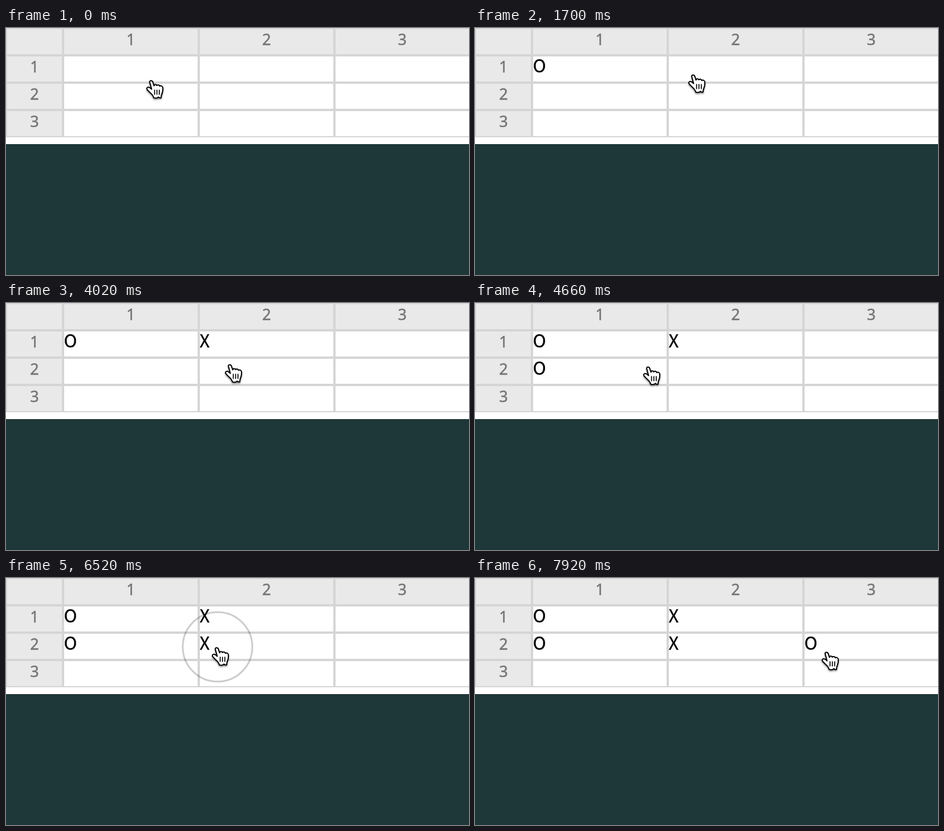
These frames come from a looping animation (812x434 px, 8 s). An HTML page:

```html
<!DOCTYPE html>
<html>
<head>
<meta charset="utf-8">
<style>
  html, body { margin: 0; width: 100%; height: 100%; overflow: hidden; background: #1e3738; }
  svg { display: block; }
  .label { font: 27px "Noto Sans", sans-serif; fill: #757575; stroke: #757575; stroke-width: .5; text-anchor: middle; }
  .mark { font: 31px "Noto Sans CJK KR", "Noto Sans CJK JP", "Noto Sans", sans-serif; stroke: #000; stroke-width: .3; }
  #hand { filter: drop-shadow(0 2px 1.5px rgba(0, 0, 0, .45)); }
</style>
</head>
<body>
<svg width="812" height="434" viewBox="0 0 812 434">
  <rect width="812" height="434" fill="#1e3738"/>
  <rect width="812" height="204" fill="#fff"/>
  <g id="grid"></g>
  <circle id="ring" r="61" fill="none" stroke="#000" stroke-width="3"/>
  <g id="hand" stroke="#000" stroke-linecap="round" stroke-linejoin="round">
    <path fill="#fff" stroke-width="2" d="M6.4 5.4C5.6 2.8 6.6 1.5 8 1.4C9.6 1.3 10.8 2.2 11.4 3.9L13.6 10.5C14 7.7 17.8 7.5 18.6 10.1C19.6 8.3 23 8.7 23.7 11.3C25.2 10 28.6 10.5 29 13.9C29.4 17.8 28.9 20.8 27.8 23.5C26.6 26.1 26.1 27.3 26 31.5C24.3 32.2 22.6 31.8 21.2 30.3C19.6 32.3 16.5 32.7 13 31.6C12.6 28.9 11 26.6 8.2 23.9C5.2 21.2 4 19.7 2 17.7C.3 15.7 .9 13.4 3.2 13.1C5.2 12.9 7 14.1 9.4 16.6Z"/>
    <path fill="none" stroke-width="1.7" d="M14.6 18V25.6M18.7 18V25.6M22.8 18V25.6"/>
  </g>
</svg>
<script>
const LOOP = 8000, STEP = 20;
const COL = 238, ROW = 48, HEAD = 100;
const grid = document.getElementById('grid');
const hand = document.getElementById('hand');
const ring = document.getElementById('ring');

function add(tag, attributes, text = '') {
  const node = document.createElementNS('http://www.w3.org/2000/svg', tag);
  for (const name in attributes) node.setAttribute(name, attributes[name]);
  node.textContent = text;
  return grid.appendChild(node);
}

// Each cell has its own 2px border, so neighbours share a 4px line.
for (let row = 0; row < 4; row++) {
  for (let col = 0; col < 4; col++) {
    const x = col ? HEAD + (col - 1) * COL : 0;
    const y = row * ROW;
    const width = col ? COL : HEAD;
    const isHeader = !row || !col;
    add('rect', { x: x + 1, y: y + 1, width: width - 2, height: ROW - 2,
      fill: isHeader ? '#e9e9e9' : '#fff', stroke: '#d5d5d5', 'stroke-width': 2 });
    if (isHeader && row + col) {
      add('text', { class: 'label', x: x + width / 2, y: y + 30 }, row + col);
    }
  }
}

// Players alternate; a mark appears when its mouse press is released.
const clicks = [
  { down: 460, up: 680, row: 1, col: 1 },
  { down: 2140, up: 2400, row: 1, col: 2 },
  { down: 4400, up: 4640, row: 2, col: 1 },
  { down: 6240, up: 6520, row: 2, col: 2 },
  { down: 7620, up: 7880, row: 2, col: 3 }
];
clicks.forEach((click, i) => {
  const x = HEAD + 1.5 + (click.col - 1) * COL;
  click.mark = add('text', { class: 'mark', x, y: click.row * ROW + 30 }, 'OX'[i % 2]);
});

const home = { x: 246, y: 91 };
const moves = [
  { from: 220, to: 420, x: 245, y: 75 },
  { from: 680, to: 900, x: 247, y: 93 },
  { from: 1540, to: 1780, x: 394, y: 79 },
  { from: 2940, to: 3640, x: 396, y: 102 },
  { from: 4000, to: 4020, x: 384, y: 107 },
  { from: 4020, to: 4360, x: 295, y: 111 },
  { from: 5180, to: 5820, x: 361, y: 121 },
  { from: 7120, to: 7300, x: 491, y: 129 },
  { from: 7300, to: 7580, x: 608, y: 129 }
];

const clamp = value => Math.min(1, Math.max(0, value));
const easeOut = k => Math.sin(k * Math.PI / 2);

function pointerAt(time) {
  let { x, y } = home;
  for (const move of moves) {
    const k = easeOut(clamp((time - move.from) / (move.to - move.from)));
    x += (move.x - x) * k;
    y += (move.y - y) * k;
  }
  return { x: Math.round(x), y: Math.round(y) };
}

function ringOpacity(time) {
  const press = clicks.find(({ down, up }) => time >= down && time < up + STEP);
  if (!press) return 0;
  return time >= press.up ? 0.2 : 0.5 * clamp((time - press.down + 40) / 140);
}

function draw(now) {
  const time = Math.floor((now % LOOP) / STEP) * STEP;
  const { x, y } = pointerAt(time);
  hand.setAttribute('transform', `translate(${x} ${y})`);
  ring.setAttribute('cx', x + 10);
  ring.setAttribute('cy', y);
  ring.setAttribute('opacity', ringOpacity(time));
  for (const { up, mark } of clicks) {
    mark.setAttribute('visibility', time >= up ? 'visible' : 'hidden');
  }
}

const start = performance.now();
function tick() {
  draw(performance.now() - start);
  requestAnimationFrame(tick);
}
tick();
</script>
</body>
</html>
```
